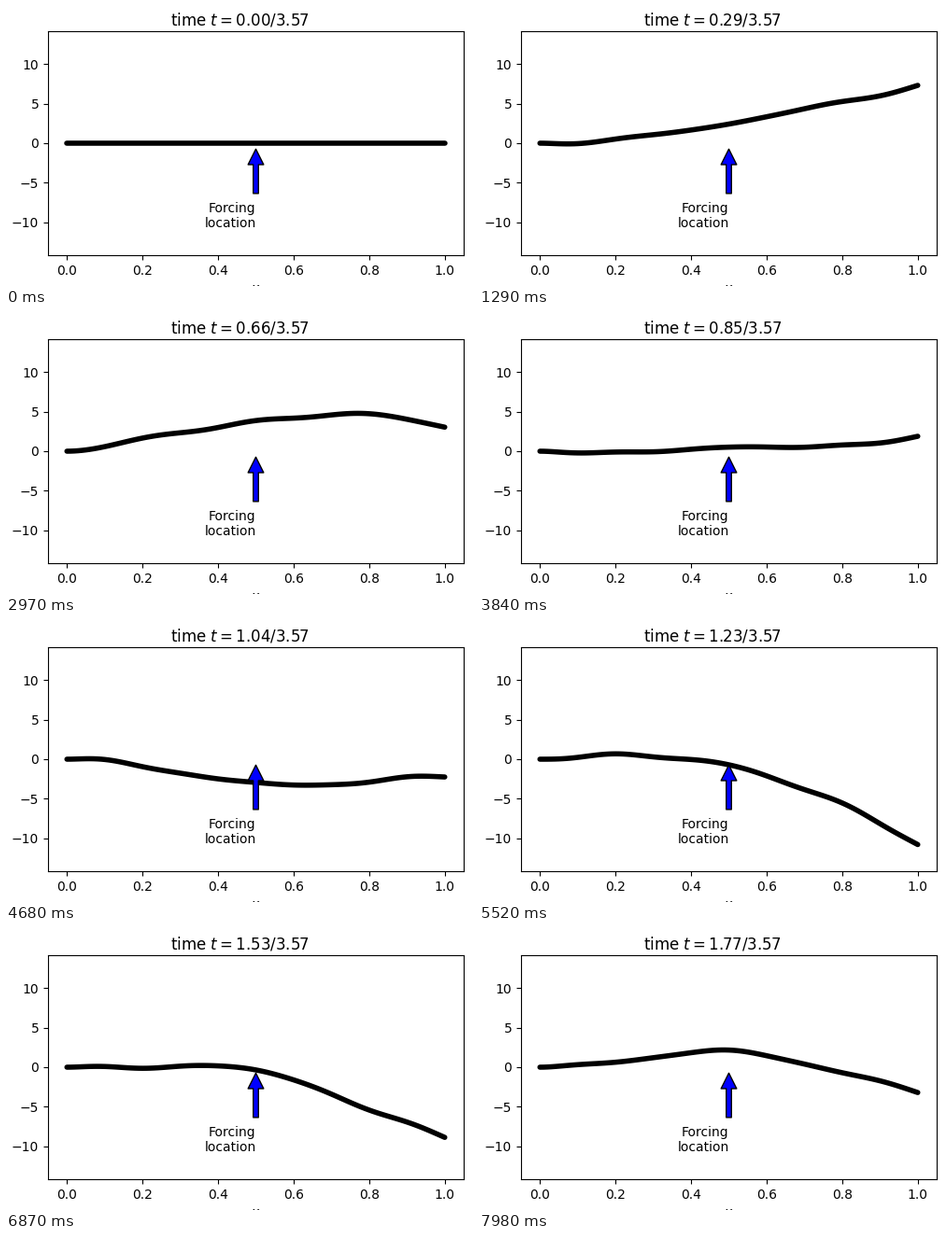
A matplotlib script that plays this animation: 500 px wide and 300 px high, repeating every 8000 ms.

```python
import numpy as np
import matplotlib.pyplot as plt
from matplotlib.animation import FuncAnimation

LOOP_MS, INTERVAL, STEP_MS = 8000, 20, 30
DT = 0.00666       # simulated time per step
IMPULSE = 22.0     # strength of the kick at t = 0
X_FORCE = 0.5
N_MODES = 10


def wave_numbers(count):
    """Roots of cos(b) cosh(b) = -1 for a clamped-free beam."""
    b = (np.arange(1, count + 1) - 0.5) * np.pi
    for _ in range(20):
        sech = 1 / np.cosh(b)
        b = b + (np.cos(b) + sech) / (np.sin(b) + sech * np.tanh(b))
    return b


def mode_shapes(b, x):
    """Mode values, one column per wave number."""
    sigma = (np.cosh(b) + np.cos(b)) / (np.sinh(b) + np.sin(b))
    z = np.outer(x, b)
    return np.cosh(z) - np.cos(z) - sigma * (np.sinh(z) - np.sin(z))


beta = wave_numbers(N_MODES)
omega = beta ** 2
total = 4 * np.pi / omega[0]   # two periods of the lowest mode
x = np.linspace(0, 1, 101)
weights = IMPULSE * mode_shapes(beta, x) * mode_shapes(beta, [X_FORCE]) / omega


def beam(t):
    return weights @ np.sin(omega * t)


fig, ax = plt.subplots(figsize=(5, 3), dpi=100)
fig.subplots_adjust(left=0.09, right=0.98, bottom=0.11, top=0.91)
line, = ax.plot(x, beam(0), "k", lw=4, solid_capstyle="round")
ax.set_xlim(-0.05, 1.05)
ax.set_ylim(-14.18, 14.18)
ax.set_xlabel("$x$")
ax.annotate("Forcing\nlocation", xy=(X_FORCE, 0), xytext=(X_FORCE, -10.65),
            ha="right", arrowprops=dict(facecolor="blue", shrink=0.1))
title = fig.suptitle("")


def update(frame):
    step = (frame * INTERVAL + INTERVAL // 2) // STEP_MS
    t = step * DT
    line.set_ydata(beam(t))
    title.set_text(f"time $t={t:.2f}/{total:.2f}$")
    return line, title


anim = FuncAnimation(fig, update, frames=LOOP_MS // INTERVAL,
                     interval=INTERVAL, repeat=True, repeat_delay=0)
plt.show()
```
